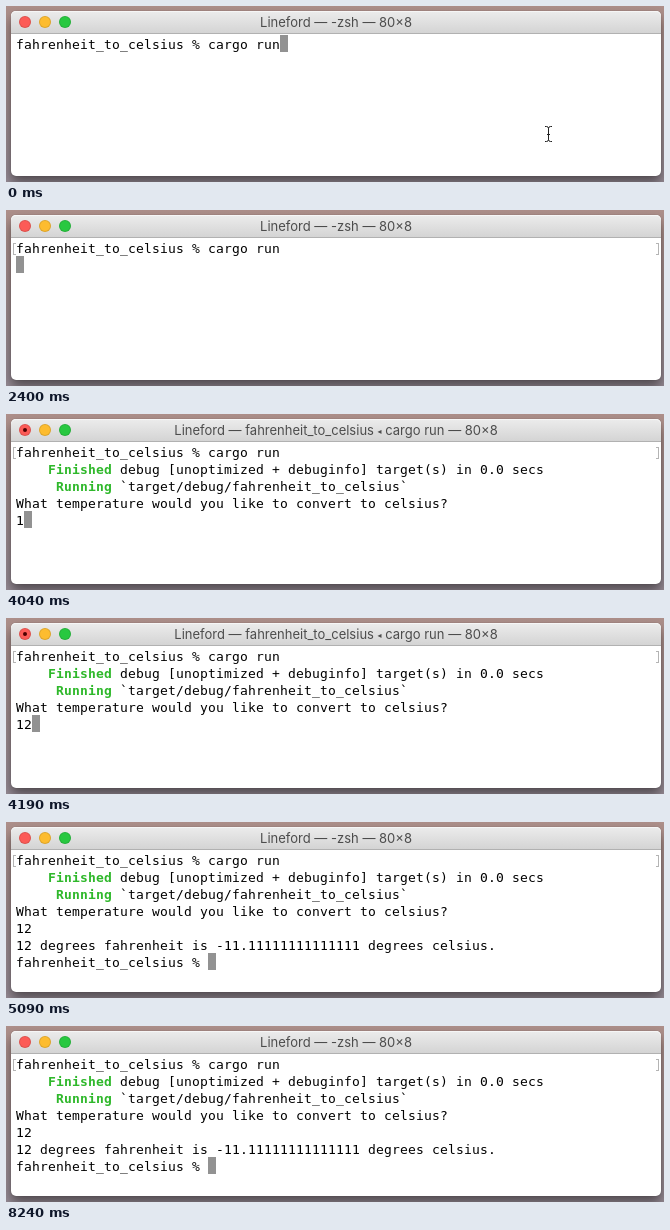
These frames come from a looping animation (658x176 px, 8.34 s). An HTML page:

```html
<!DOCTYPE html>
<html lang="en">
<head>
<meta charset="utf-8">
<title>cargo run</title>
<style>
  html, body { margin: 0; width: 100%; height: 100%; overflow: hidden; }
  body {
    position: relative;
    background: linear-gradient(#ad8f8a, #a08b8c 45%, #968b95);
  }
  .stage { position: absolute; inset: 0 auto auto 0; width: 658px; height: 176px; overflow: hidden; }
  .stage * { position: absolute; box-sizing: border-box; }

  .window {
    left: 5px; top: 5px; width: 650px; height: 165px;
    border-radius: 5px; background: #fff;
    box-shadow: 0 0 1px rgba(0, 0, 0, .4), 0 7px 12px rgba(0, 0, 0, .45);
  }
  .bar {
    left: 0; top: 0; width: 100%; height: 23px;
    border-radius: 5px 5px 0 0; border-bottom: 1px solid #b1b1b1;
    background: linear-gradient(#ececec, #d4d4d4);
    box-shadow: inset 0 1px #f6f6f6;
  }
  .title {
    left: 0; width: 100%; text-align: center; white-space: pre;
    font: 13px/22px Inter, Roboto, sans-serif; color: #4c4c4c;
  }
  .title small { position: static; font: 8px "DejaVu Sans", sans-serif; vertical-align: 1px; }
  .light { top: 5px; width: 12px; height: 12px; border-radius: 50%; border: .5px solid rgba(0, 0, 0, .12); }
  .dot { left: 12px; top: 9px; width: 4px; height: 4px; border-radius: 50%; background: #4d0000; }

  /* Text grid: 8 x 17 px cells */
  .row {
    left: 10px; top: calc(30px + var(--r) * 17px);
    white-space: pre; color: #000;
    font: 13px/17px "DejaVu Sans Mono", monospace;
    letter-spacing: calc(8px - 1ch);
    font-variant-ligatures: none;
  }
  .row b { position: static; color: #2fb82b; }
  .mark { top: 33px; width: 3px; height: 12px; border: 1px solid #b4b4b4; }
  .open { left: 7px; border-right: 0; }
  .close { left: 650px; border-left: 0; }
  .block { width: 8px; height: 17px; background: #929292; animation-name: block; }
  svg { left: 0; top: 0; }

  .anim { animation-duration: 8340ms; animation-timing-function: step-end; animation-iteration-count: infinite; }
  .beam    { animation-name: beam; }
  .enter   { animation-name: enter; }
  .built   { animation-name: built; }
  .one     { animation-name: one; }
  .two     { animation-name: two; }
  .result  { animation-name: result; }
  .running { animation-name: running; }
  .idle    { animation-name: idle; }
  .pointer { animation-name: pointer; }

  @keyframes beam    { 0% { visibility: visible } 1.7986%, 100% { visibility: hidden } }
  @keyframes enter   { 0% { visibility: hidden } 28.7770%, 100% { visibility: visible } }
  @keyframes built   { 0% { visibility: hidden } 30.4556%, 100% { visibility: visible } }
  @keyframes one     { 0% { visibility: hidden } 48.4412%, 100% { visibility: visible } }
  @keyframes two     { 0% { visibility: hidden } 50.2398%, 100% { visibility: visible } }
  @keyframes result  { 0% { visibility: hidden } 59.2326%, 100% { visibility: visible } }
  @keyframes running { 0%, 61.0312%, 100% { visibility: hidden } 30.4556% { visibility: visible } }
  @keyframes idle    { 0%, 61.0312%, 100% { visibility: visible } 30.4556% { visibility: hidden } }
  @keyframes pointer { 0%, 97.0024%, 100% { visibility: hidden } 95.2038% { visibility: visible } }
  @keyframes block {
    0%             { left: 274px; top: 29px }
    28.7770%       { left: 10px; top: 46px }
    30.4556%       { left: 10px; top: 97px }
    48.4412%       { left: 18px; top: 97px }
    50.2398%       { left: 26px; top: 97px }
    59.2326%, 100% { left: 202px; top: 131px }
  }
</style>
</head>
<body>
<div class="stage">
  <div class="window">
    <div class="bar">
      <i class="light" style="left:8px;background:#fc5b57"></i>
      <i class="light" style="left:28px;background:#fdbc2f"></i>
      <i class="light" style="left:48px;background:#28c840"></i>
      <i class="dot anim running"></i>
      <div class="title anim idle">Lineford — -zsh — 80×8</div>
      <div class="title anim running">Lineford — fahrenheit_to_celsius <small>◂</small> cargo run — 80×8</div>
    </div>
  </div>

  <i class="mark open anim enter"></i>
  <i class="mark close anim enter"></i>
  <i class="block anim"></i>

  <div class="row" style="--r:0">fahrenheit_to_celsius % cargo run</div>
  <div class="row anim built" style="--r:1">    <b>Finished</b> debug [unoptimized + debuginfo] target(s) in 0.0 secs</div>
  <div class="row anim built" style="--r:2">     <b>Running</b> `target/debug/fahrenheit_to_celsius`</div>
  <div class="row anim built" style="--r:3">What temperature would you like to convert to celsius?</div>
  <div class="row anim one" style="--r:4">1</div>
  <div class="row anim two" style="--r:4;left:18px">2</div>
  <div class="row anim result" style="--r:5">12 degrees fahrenheit is -11.11111111111111 degrees celsius.</div>
  <div class="row anim result" style="--r:6">fahrenheit_to_celsius %</div>

  <svg width="658" height="176">
    <path class="anim beam" fill="none" stroke="#222"
      d="M539 120.5h1.5q2 0 2 2v11q0 2-2 2H539M546 120.5h-1.5q-2 0-2 2v11q0 2 2 2H546M541 128.5h3"/>
    <path class="anim pointer" fill="#f2f2f2" d="M623 174h1l2 2h-3z"/>
  </svg>
</div>
</body>
</html>
```
